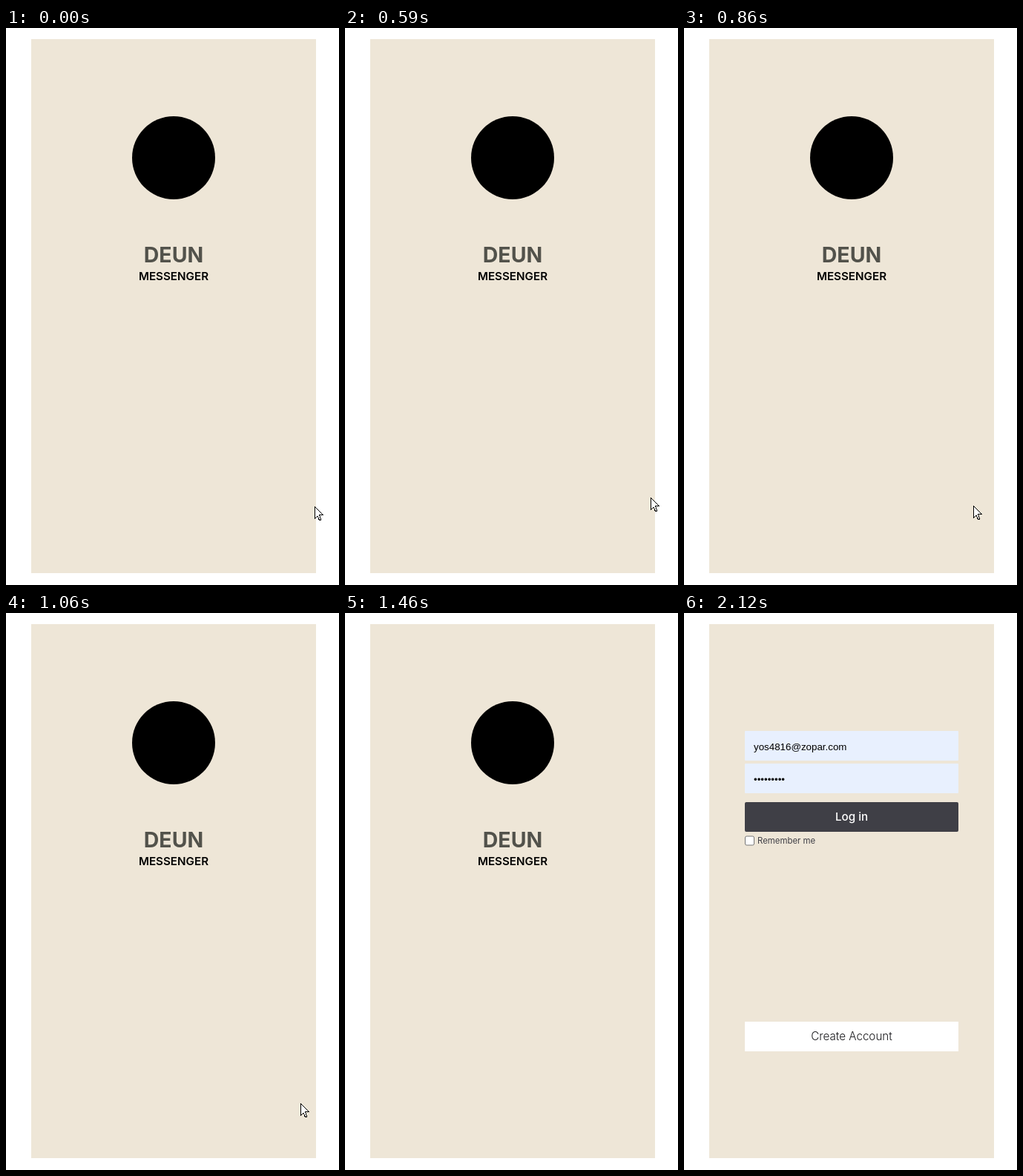
An HTML page for the animation above (2730 ms loop, 449x751 px).

```html
<!DOCTYPE html>
<html lang="en">
<head>
<meta charset="utf-8">
<title>Messenger login</title>
<style>
  html, body { margin: 0; width: 100%; height: 100%; overflow: hidden; background: #fff; }
  svg { display: block; width: 449px; height: 751px; }
  text { font: 400 15.2px Inter, sans-serif; font-optical-sizing: none; }
  .mid { text-anchor: middle; }
  .title { font-size: 28.5px; font-weight: 700; fill: #52524b; }
  .subtitle { font-weight: 600; }
  .field { fill: #fff; }
  .hint { fill: #9ca3af; }
  .filled .field { fill: #e8f0fe; }
  .filled text { font: 13.333px "Liberation Sans", Arial, sans-serif; }
  .button { font-weight: 500; fill: #fff; }
  .label { font-size: 11.4px; fill: #3f3f46; }
  .link { font-weight: 300; fill: #18181b; }
</style>
</head>
<body>
<svg viewBox="0 0 449 751">
  <rect x="34" y="15" width="384" height="720" fill="#eee6d7"/>

  <g id="splash">
    <circle cx="226" cy="175" r="56"/>
    <text class="mid title" x="226" y="316">DEUN</text>
    <text class="mid subtitle" x="226" y="340">MESSENGER</text>
  </g>

  <g id="login">
    <g id="fields">
      <rect class="field" x="82" y="159" width="288" height="40" rx="1"/>
      <rect class="field" x="82" y="203" width="288" height="40" rx="1"/>
      <text id="email" class="hint" x="94" y="185"></text>
      <text id="password" class="hint" x="94" y="229"></text>
    </g>
    <rect x="82" y="255" width="288" height="40" rx="2" fill="#3f3f46"/>
    <text class="mid button" x="226" y="280">Log in</text>
    <rect x="82.5" y="301" width="12" height="12" rx="2" fill="#fff" stroke="#767676"/>
    <text class="label" x="99" y="311">Remember me</text>
    <rect x="82" y="551" width="288" height="40" fill="#fff"/>
    <text class="mid link" x="226" y="576">Create Account</text>
  </g>

  <path id="cursor" d="M.5 .5V16.5L4 13 6.5 18.5H8.5V17.5L6.5 11.5H11.5Z"
        fill="#fff" stroke="#000" shape-rendering="crispEdges"/>
</svg>
<script>
  const LOOP = 2730;
  const STEP = 65;
  const CURSOR_GONE = 1460;
  const LOGIN_AT = 1990;
  const AUTOFILL_AT = 2120;

  // Two pointer sweeps, each an arc through its middle point
  const rise = { start: 390, steps: 8, from: [416, 645], via: [412, 633], to: [390, 644] };
  const dip = { start: 1060, steps: 6, from: rise.to, via: [408, 678], to: [417, 660] };

  const el = id => document.getElementById(id);
  const show = (node, on) => node.setAttribute("display", on ? "inline" : "none");

  function arcPoint({ start, steps, from, via, to }, t) {
    const step = Math.floor((t - start) / STEP) + 1;
    const u = Math.min(Math.max(step / steps, 0), 1);
    return from.map((a, i) => Math.floor(
      a * (1 - u) * (1 - 2 * u) + via[i] * 4 * u * (1 - u) + to[i] * u * (2 * u - 1)
    ));
  }

  function draw(t) {
    const filled = t >= AUTOFILL_AT;
    show(el("splash"), t < LOGIN_AT);
    show(el("login"), t >= LOGIN_AT);
    show(el("cursor"), t < CURSOR_GONE);

    el("fields").setAttribute("class", filled ? "filled" : "");
    el("email").textContent = filled ? "yos4816@zopar.com" : "your@company.io";
    el("password").textContent = filled ? "•".repeat(9) : "password";
    for (const id of ["email", "password"]) el(id).classList.toggle("hint", !filled);

    const [x, y] = arcPoint(t < dip.start ? rise : dip, t);
    el("cursor").setAttribute("transform", `translate(${x} ${y})`);
  }

  const start = performance.now();
  function tick() {
    draw((performance.now() - start) % LOOP);
    requestAnimationFrame(tick);
  }
  draw(0);
  requestAnimationFrame(tick);
</script>
</body>
</html>
```
